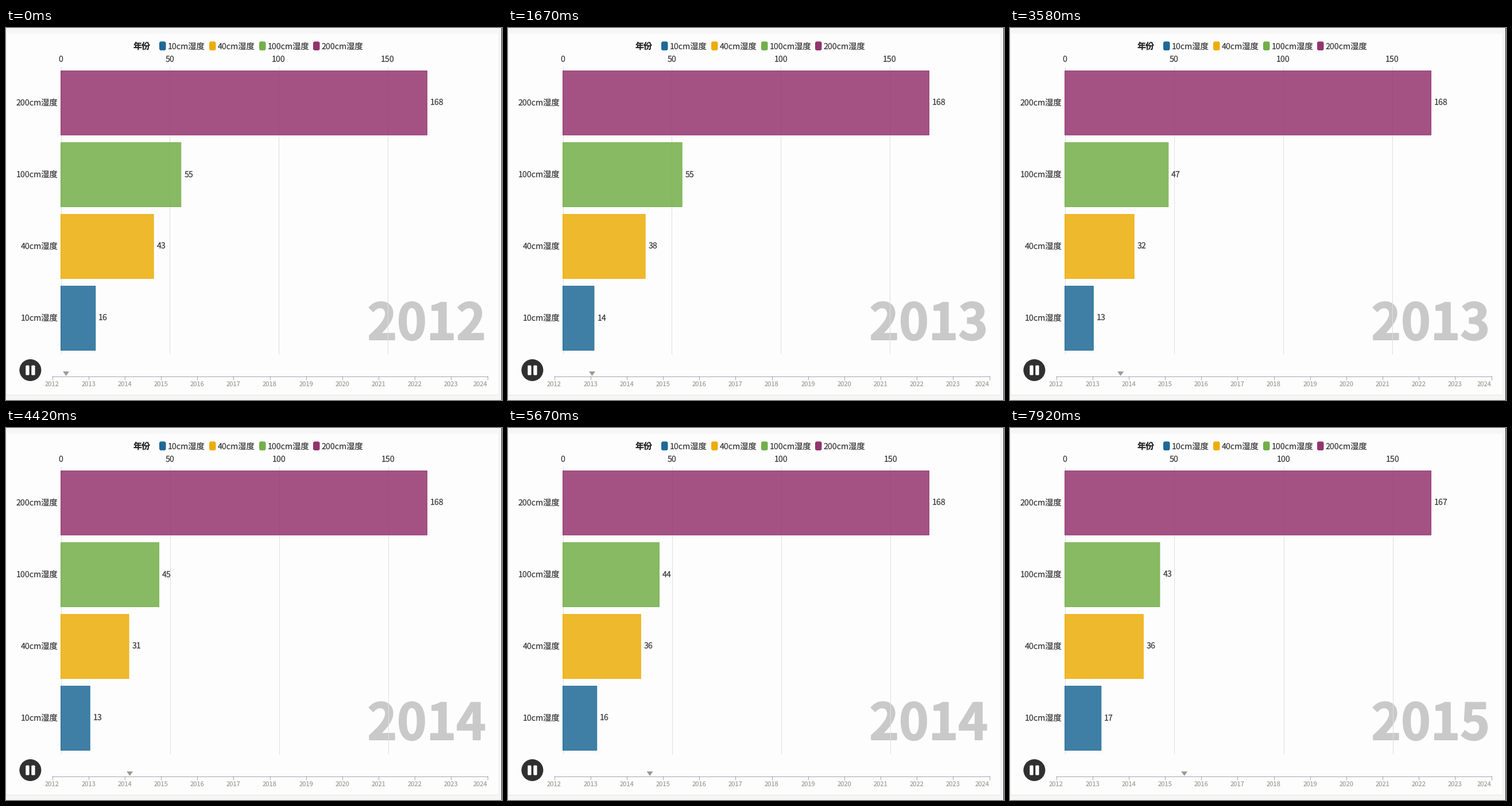
Recreate the animation shown at these times as a matplotlib script. Size 864x648 px, loop 8 s.

```python
import numpy as np
import matplotlib.pyplot as plt
from matplotlib.animation import FuncAnimation
from matplotlib.patches import Circle, FancyBboxPatch, Polygon, Rectangle
from matplotlib.patheffects import withStroke

W, H = 864, 648
FPS, FRAMES = 12, 96
INK = "#3a3a3a"
GREY = "#c9c9c9"
plt.rcParams["font.family"] = "Noto Sans CJK JP"
plt.rcParams["text.hinting"] = "none"

LEFT, BAR_END = 95.5, 733.5
BAR_H, BAR_TOP, BAR_STEP = 112, 74.5, 125
YEAR_X0, YEAR_STEP = 80.5, 63.17
MARK_X0, MARK_SPEED = 104.6, 25.15

NAMES = ["200cm湿度", "100cm湿度", "40cm湿度", "10cm湿度"]
COLORS = ["#94346e", "#73af48", "#edad08", "#1d6996"]

# Readings per year, linear in between
YEARS = [2012.38, 2013, 2014, 2015, 2015.54]
DATA = [
    [168.1, 168.0, 167.8, 167.55, 167.38],
    [55.15, 55.14, 45.2, 43.55, 43.4],
    [42.6, 38.2, 29.9, 39.0, 35.86],
    [15.9, 14.42, 12.72, 17.2, 16.6],
]

fig = plt.figure(figsize=(W / 72, H / 72), dpi=72, facecolor="#f6f6f6")
ax = fig.add_axes([0, 0, 1, 1])
ax.set(xlim=(0, W), ylim=(H, 0))
ax.axis("off")


def box(x, y, w, h, color, z=1, lw=0, **kw):
    return ax.add_patch(Rectangle((x, y), w, h, fc=color, ec=color, lw=lw,
                                  zorder=z, **kw))


def round_box(x, y, w, h, r, color, z=1):
    style = f"round,pad=0,rounding_size={r}"
    ax.add_patch(FancyBboxPatch((x, y), w, h, boxstyle=style, fc=color,
                                lw=0, zorder=z))


def text(x, y, s, size=14.25, color=INK, z=5, **kw):
    return ax.text(x, y, s, fontsize=size, color=color, zorder=z,
                   va="baseline", **kw)


def line(xs, ys, color, z=2):
    return ax.plot(xs, ys, color=color, lw=1, zorder=z,
                   solid_capstyle="butt")[0]


# Page
box(0, 10, 857, 629, "#fdfdfd", 0)
box(0, 10, 1, 629, "#e9e9e6", 0)
box(0, 639, 857, 1, "#e6e6da", 0)
box(863, 0, 1, H, "#1c1c1c", 0)

# Legend
text(221.3, 36.3, "年份", 15, "#222222", weight="bold")
for x, name, color in zip([535, 441, 354, 267], NAMES, COLORS):
    round_box(x, 23.5, 11.5, 15.5, 3, color)
    text(x + 14.6, 36.3, name)

# Value axis
grid = [line([LEFT] * 2, [67, 568], "#dedee6") for _ in range(4)]
ticks = [text(LEFT, 59.6, str(50 * k), ha="center") for k in range(4)]

# Bars
bars, values = [], []
for k, (name, color) in enumerate(zip(NAMES, COLORS)):
    y = BAR_TOP + k * BAR_STEP
    bars.append(box(LEFT, y, 1, BAR_H, color, 3, 1, alpha=0.85, snap=False,
                    joinstyle="miter"))
    text(90.3, y + 60.2, name, ha="right")
    values.append(text(0, y + 60.2, ""))

year_label = text(629.5, 543, "", 87.5, GREY, 1, weight="bold",
                  path_effects=[withStroke(linewidth=2, foreground=GREY)])

# Timeline
line([80, 839], [606.5, 606.5], "#a6a6b2")
for k in range(13):
    x = YEAR_X0 + k * YEAR_STEP
    line([x, x], [606, 612.5], "#a6a6b2")
    last = k == 12
    text(839 if last else x, 623.8, str(2012 + k), 11.2, "#a3a396",
         ha="right" if last else "center")
marker = ax.add_patch(Polygon([[0, 0], [1, 0], [0, 1]], fc="#9a9a92", lw=0,
                              zorder=4))

# Pause button
ax.add_patch(Circle((42.4, 596), 19, fc="#303030", lw=0, zorder=3))
for x in (34.3, 44.3):
    round_box(x, 587.7, 6.3, 17, 1.5, "white", 4)


def draw(i):
    x = MARK_X0 + MARK_SPEED * i / FPS
    year = 2012 + (x - YEAR_X0) / YEAR_STEP
    now = [np.interp(year, YEARS, row) for row in DATA]
    scale = (BAR_END - LEFT) / now[0]

    for k, (rule, tick) in enumerate(zip(grid, ticks)):
        gx = LEFT + 50 * k * scale
        rule.set_xdata([gx, gx])
        tick.set_x(gx)
    for bar, label, v in zip(bars, values, now):
        bar.set_width(v * scale)
        label.set_x(LEFT + v * scale + 5.5)
        label.set_text(f"{v:.0f}")
    year_label.set_text(str(int(year)))
    marker.set_xy([[x - 5.5, 598.3], [x + 5.5, 598.3], [x, 606]])
    return [*grid, *ticks, *bars, *values, year_label, marker]


anim = FuncAnimation(fig, draw, frames=FRAMES, interval=1000 / FPS,
                     repeat=True, repeat_delay=0)
plt.show()
```
